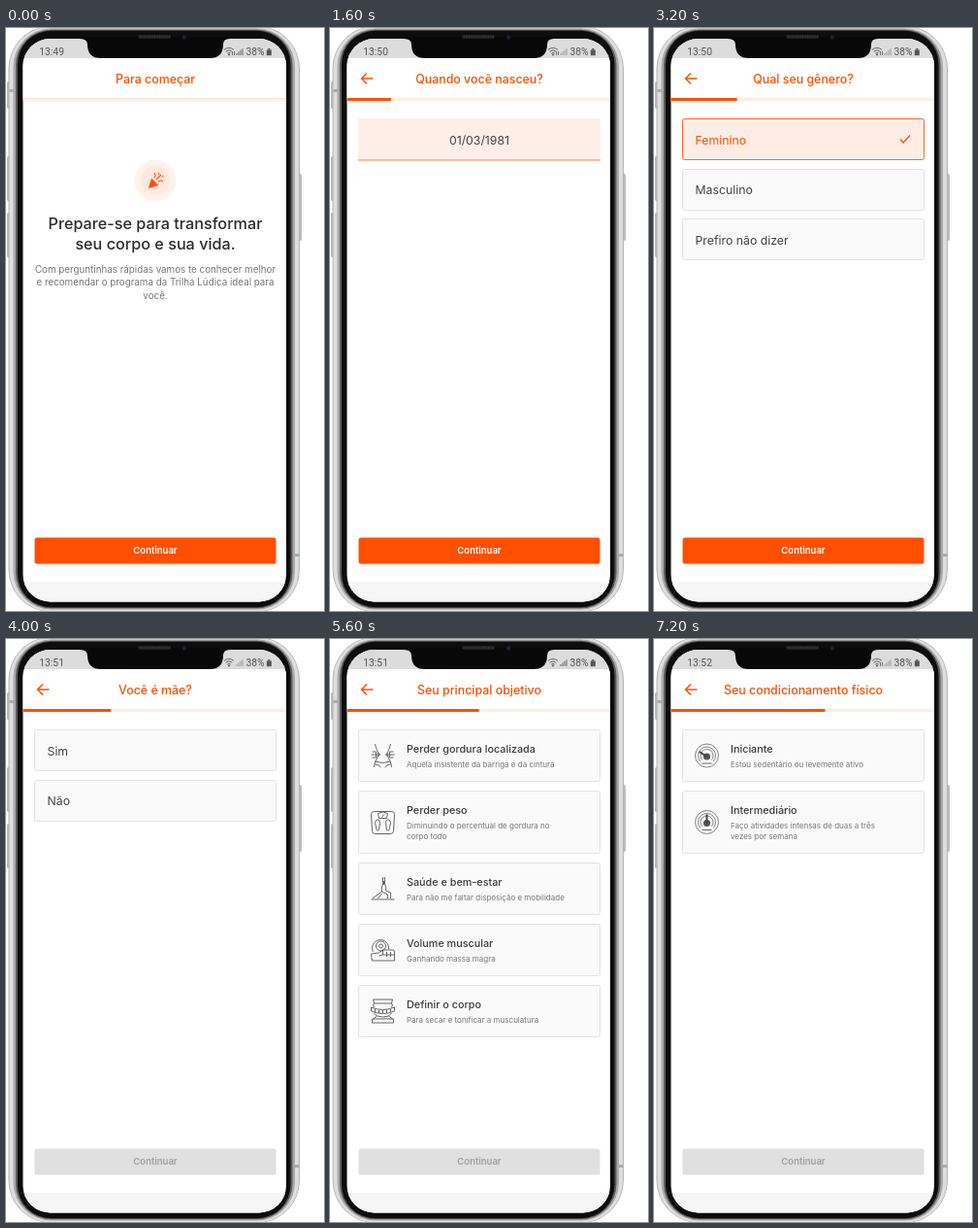
These frames come from a looping animation (328x600 px, 8000 ms). An HTML page with a canvas:

```html
<!DOCTYPE html>
<html lang="pt-BR">
<head>
<meta charset="utf-8">
<title>Questionário</title>
<style>
  html, body { margin: 0; width: 100%; height: 100%; overflow: hidden; background: #fff; }
  canvas { display: block; width: 328px; height: 600px; }
</style>
</head>
<body>
<canvas id="stage"></canvas>
<script>
const W = 328, H = 600, STEP = 800;
const ORANGE = '#ff4f00', INK = '#444', MUTED = '#777';
const canvas = document.getElementById('stage');
const ratio = window.devicePixelRatio || 1;
canvas.width = W * ratio;
canvas.height = H * ratio;
const ctx = canvas.getContext('2d');
ctx.scale(ratio, ratio);

const yesNo = ['Sim', 'Não'];
const genders = ['Feminino', 'Masculino', 'Prefiro não dizer'];
const goals = [
  ['waist', 'Perder gordura localizada', 'Aquela insistente da barriga e da cintura'],
  ['scale', 'Perder peso', 'Diminuindo o percentual de gordura no', 'corpo todo'],
  ['yoga', 'Saúde e bem-estar', 'Para não me faltar disposição e mobilidade'],
  ['weight', 'Volume muscular', 'Ganhando massa magra'],
  ['tape', 'Definir o corpo', 'Para secar e tonificar a musculatura']
];
const levels = [
  ['gaugeLow', 'Iniciante', 'Estou sedentário ou levemente ativo'],
  ['gaugeMid', 'Intermediário', 'Faço atividades intensas de duas a três', 'vezes por semana']
];

// step counts twelfths of the progress bar
const birth = { title: 'Quando você nasceu?', step: 2, ready: true };
const gender = { title: 'Qual seu gênero?', step: 3, clock: '13:50', options: genders };
const mother = { title: 'Você é mãe?', step: 4, clock: '13:51', options: yesNo };
const goal = { title: 'Seu principal objetivo', step: 6, clock: '13:51', cards: goals, strong: true };
const scenes = [
  { title: 'Para começar', step: 0, clock: '13:49', intro: true, ready: true, strong: true },
  { ...birth, clock: '13:49', date: '' },
  { ...birth, clock: '13:50', date: '01/03/1981' },
  gender,
  { ...gender, picked: 0, ready: true },
  mother,
  { ...mother, picked: 1, ready: true, strong: true },
  goal,
  { ...goal, picked: 1, ready: true },
  { title: 'Seu condicionamento físico', step: 7, clock: '13:52', cards: levels }
];

// Icons are drawn around their own centre
const icons = {
  waist: 'M-8 -12C-7 -6 -4 -4 -5 0S-9 7 -9 12M8 -12C7 -6 4 -4 5 0S9 7 9 12M-8 6Q0 9 8 6M-8 9Q-4 9 -2 12M8 9Q4 9 2 12M-12 -1H-3M-5 -3L-3 -1L-5 1M12 -1H3M5 -3L3 -1L5 1M-11 -4H-7V2H-11M11 -4H7V2H11',
  scale: 'M-9 -11H9Q12 -11 12 -8L11 9Q11 12 8 12H-8Q-11 12 -11 9L-12 -8Q-12 -11 -9 -11ZM-5 -9Q0 -12 5 -9L4 -4H-4ZM-1 -5L1 -8M-7 -2Q-3 -4 -3 1L-4 8Q-7 10 -7 5Q-9 0 -7 -2M7 -2Q3 -4 3 1L4 8Q7 10 7 5Q9 0 7 -2',
  yoga: 'M0 -12V-5M2 -12V-5M1 -8V-4M0 -5Q-2 -1 -1 3L-8 8L-11 10M2 -5Q4 -1 3 2L8 4L8 10M-1 5L-5 10M3 5L5 6V10M-1 3L3 5M-12 11H12',
  weight: 'M-10 2A8.5 8.5 0 1 1 6 -1M-7 -4A5 5 0 1 1 3 -4A5 5 0 1 1 -7 -4M-4 -4A2 2 0 1 1 0 -4A2 2 0 1 1 -4 -4M-12 4L-4 3L0 0H10Q12 0 12 2V11H-11Q-12 8 -12 4M0 0V5L-4 6M4 2V7M8 2V7M0 5H12',
  tape: 'M-10 -12H10L9 -8H-9ZM-9 -8Q-11 -6 -9 -4M9 -8Q11 -6 9 -4M-12 -4Q0 1 12 -4V0Q0 5 -12 0ZM-8 -2V1M-4 -1V2M0 -1V2M4 -1V2M8 -2V1M-9 2L-6 5L-10 8M9 2L6 5L10 8M-6 5Q0 7 6 5M-11 8H11V12H-11Z'
};

function box(x, y, w, h, r, fill, stroke) {
  ctx.beginPath();
  ctx.roundRect(x, y, w, h, r);
  if (fill) { ctx.fillStyle = fill; ctx.fill(); }
  if (stroke) { ctx.strokeStyle = stroke; ctx.lineWidth = 1; ctx.stroke(); }
}

function rect(x, y, w, h, fill) {
  ctx.fillStyle = fill;
  ctx.fillRect(x, y, w, h);
}

function disc(x, y, r, fill) {
  ctx.beginPath();
  ctx.arc(x, y, r, 0, 7);
  ctx.fillStyle = fill;
  ctx.fill();
}

function ring(x, y, r, color, from = 0, to = Math.PI * 2) {
  ctx.beginPath();
  ctx.arc(x, y, r, from, to);
  ctx.strokeStyle = color;
  ctx.stroke();
}

function text(str, x, y, size, color, weight = 400, align = 'left', family = 'Inter') {
  ctx.font = `${weight} ${size}px ${family}, sans-serif`;
  ctx.textAlign = align;
  ctx.fillStyle = color;
  ctx.fillText(str, x, y);
}

function line(d, x, y, color, width = 1) {
  ctx.save();
  ctx.translate(x, y);
  ctx.strokeStyle = color;
  ctx.lineWidth = width;
  ctx.stroke(new Path2D(d));
  ctx.restore();
}

function gauge(x, y, angle) {
  ctx.lineWidth = 0.8;
  ring(x, y, 12, '#666');
  ring(x, y, 9, '#666', 2.4, 7);
  ring(x, y, 6.5, '#666', 2.4, 7);
  disc(x, y + 1, 3.6, '#555');
  ctx.save();
  ctx.translate(x, y + 1);
  ctx.rotate(angle);
  line('M0 0V-9', 0, 0, '#444', 2);
  ctx.restore();
  line('M-5 8H5', x, y, '#666', 1);
}

function icon(name, x, y, color) {
  if (name === 'gaugeLow') gauge(x, y, -1);
  else if (name === 'gaugeMid') gauge(x, y, 0);
  else line(icons[name], x, y, color, 0.9);
}

function panel(y, h, picked) {
  box(29.5, y + 0.5, 249, h - 1, 2, picked ? '#ffece4' : '#fafafa', picked ? '#ff6a2d' : '#e3e3e3');
  if (picked) line('M-5 0L-2 3.5L5 -4', 259, y + h / 2, ORANGE, 1.2);
}

function drawIntro() {
  disc(154, 157, 21.5, '#fff2ec');
  disc(154, 157, 15, '#ffe8de');
  ctx.fillStyle = ORANGE;
  ctx.fill(new Path2D('M147 165L150 154.5L157.5 162Z'));
  line('M0 -3Q2 -5 0 -8M2 -1L7 -6M4 1Q7 -1 9 1M4 -8L5 -6M8 -4L9 -5', 153, 157, ORANGE, 1.1);
  text('Prepare-se para transformar', 154, 207, 16.2, '#2b2b2b', 500, 'center');
  text('seu corpo e sua vida.', 154, 228, 16.2, '#2b2b2b', 500, 'center');
  ['Com perguntinhas rápidas vamos te conhecer melhor',
   'e recomendar o programa da Trilha Lúdica ideal para',
   'você.'].forEach((s, i) => text(s, 154, 251.5 + i * 13.8, 9.8, MUTED, 400, 'center'));
}

function drawDate(value) {
  rect(29, 93, 250, 43, value ? '#ffeee7' : '#fafafa');
  rect(29, 135.3, 250, 1.3, value ? '#ff9a70' : '#e3e3e3');
  text(value || 'DD/MM/AAAA', 154, 119.5, 12.3, value ? INK : '#aaa', 400, 'center');
}

function drawOptions({ options, picked }) {
  options.forEach((label, i) => {
    const y = 93 + i * 51.5;
    panel(Math.round(y), 43, i === picked);
    text(label, 42.5, y + 26.5, 12.3, i === picked ? ORANGE : INK);
  });
}

function drawCards({ cards, picked }) {
  let y = 93;
  cards.forEach(([name, title, ...lines], i) => {
    const on = i === picked, h = lines.length > 1 ? 65 : 54;
    panel(y, h, on);
    icon(name, 54.5, y + h / 2, on ? ORANGE : '#555');
    text(title, 79, y + 24, 10.8, on ? ORANGE : '#3c3c3c', 500);
    lines.forEach((s, n) => text(s, 79, y + 39 + n * 10.6, 8, on ? ORANGE : MUTED));
    y += h + 9;
  });
}

function drawStatus({ clock, strong }) {
  const tone = strong ? '#666' : '#999';
  rect(17, 10, 273, 21, '#dcdcdc');
  text(clock, 34.3, 28, 10.3, '#555', 400, 'left', 'Roboto');
  text('38%', 247.5, 28, 10.3, '#555', 400, 'left', 'Roboto');
  ctx.lineWidth = 1;
  [2.5, 5, 7.5].forEach(r => ring(230, 28, r, '#666', -2.3, -0.85));
  disc(230, 27.5, 1, '#555');
  if (clock !== '13:51') line('M0 -3V1M2 -3V1', 233.5, 27, '#666', 0.9);
  for (let i = 0; i < 4; i++) rect(237.5 + i * 2, 26 - i * 1.6, 1, 2 + i * 1.6, tone);
  rect(268.8, 22.5, 5, 5.7, '#555');
  rect(270.3, 21, 2, 1.6, '#555');
}

function drawHeader({ title, step, intro }) {
  rect(17, 31, 273, 41, '#fff');
  text(title, 154, 57, 12.4, ORANGE, 500, 'center');
  if (!intro) line('M6 0H-6M-0.5 -5.5L-6 0L-0.5 5.5', 38.5, 52, ORANGE, 1.5);
  rect(17, 72, 273, 3, intro ? '#fff0ea' : '#ffede5');
  if (intro) rect(17, 72, 273, 1, '#ffe1d5');
  rect(17, 72, 0.5 + step * 22.7, 3, ORANGE);
}

function drawButton(ready) {
  box(29.5, 524.5, 249, 27, 2.5, ready ? ORANGE : '#e0e0e0');
  text('Continuar', 154, 541.2, 9.5, ready ? '#fff' : '#a0a0a0', 600, 'center');
}

function drawBody() {
  [[55, 28], [132, 46], [190, 46]].forEach(([y, h]) => box(1, y, 4, h, 1.5, '#b9b9b9'));
  box(301, 150, 4, 69, 1.5, '#bdbdbd');
  // Nested shells from the silver rim to the thin black bezel
  [[0, '#b4b4b4'], [1, '#dedede'], [5, '#a8a8a8'], [7.5, '#5a5a5a'], [9.5, '#0d0d0d']].forEach(([inset, fill]) =>
    box(2.5 + inset, -2 + inset / 2, 300.5 - 2 * inset, 603 - inset, 44 - inset, fill));
  rect(3.5, 63, 5, 3, '#aaa');
  rect(297, 541, 5, 3, '#aaa');
}

function drawNotch() {
  ctx.fillStyle = '#080808';
  ctx.fill(new Path2D('M76 9H231V11Q224 11 224 17Q224 31 210 31H98Q84 31 84 17Q84 11 76 11Z'));
  box(136, 7, 34, 4, 2, '#222');
  for (let x = 138; x < 169; x += 2.5) rect(x, 8.2, 1, 1.4, '#444');
  disc(184, 9.5, 2.2, '#1b2233');
}

function draw(scene) {
  rect(0, 0, W, H, '#fff');
  drawBody();
  ctx.save();
  ctx.beginPath();
  ctx.roundRect(17.5, 11, 271.5, 579.5, 28);
  ctx.clip();
  rect(17, 10, 273, 582, '#fff');
  drawStatus(scene);
  drawHeader(scene);
  if (scene.intro) drawIntro();
  if (scene.date !== undefined) drawDate(scene.date);
  if (scene.options) drawOptions(scene);
  if (scene.cards) drawCards(scene);
  drawButton(scene.ready);
  rect(17, 570, 273, 22, '#f6f6f6');
  ctx.restore();
  drawNotch();
}

const start = performance.now();
function frame() {
  const t = performance.now() - start;
  draw(scenes[Math.floor(t / STEP) % scenes.length]);
  requestAnimationFrame(frame);
}
frame();
</script>
</body>
</html>
```
